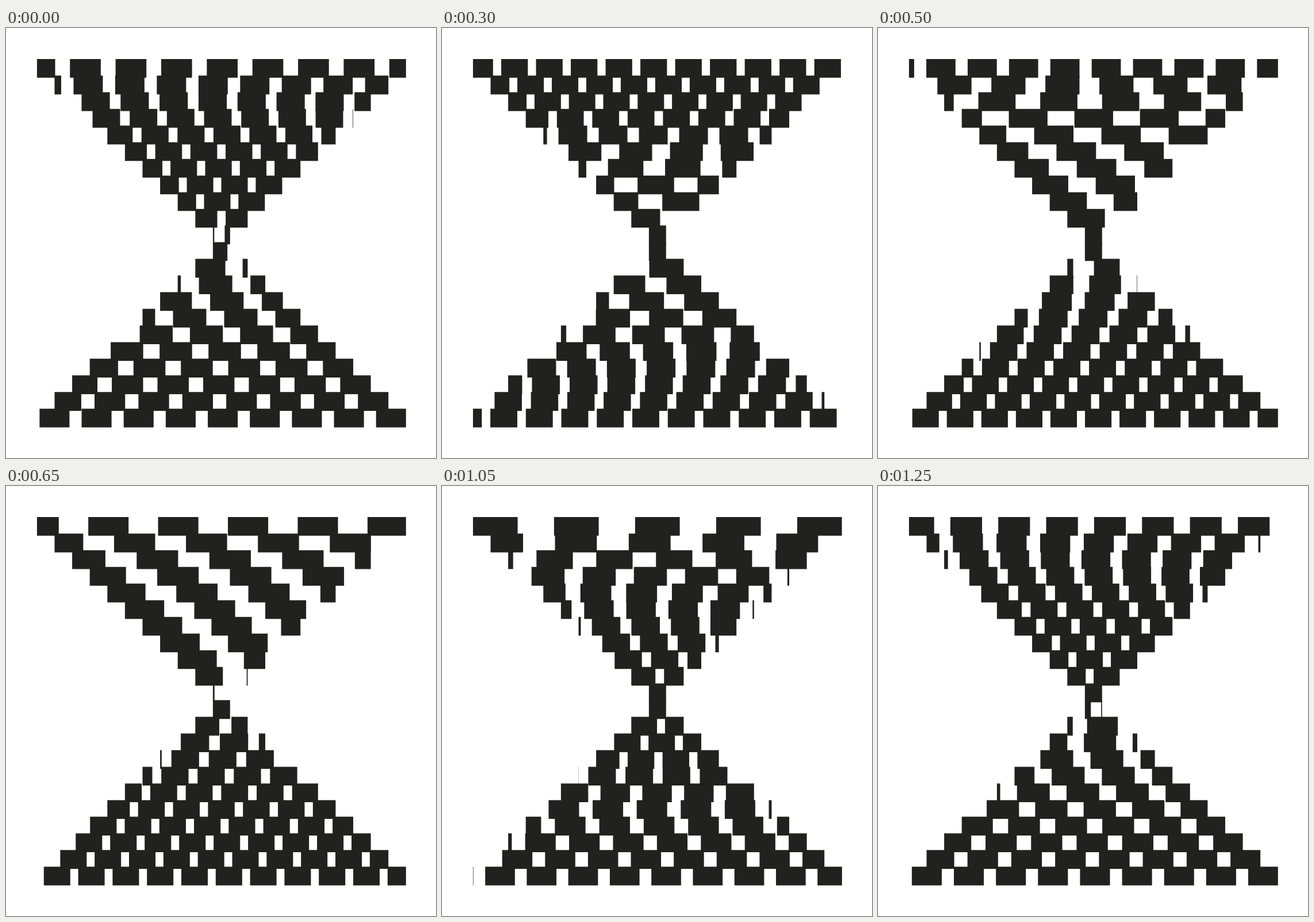
Write an HTML page with a canvas that moves like this. It is 748 px wide and 748 px high and loops after 1300 ms.

```html
<!DOCTYPE html>
<html lang="en">
<head>
<meta charset="utf-8">
<title>Dashed hourglass</title>
<style>
  html, body { margin: 0; width: 100%; height: 100%; overflow: hidden; background: #fff; }
  canvas { display: block; }
</style>
</head>
<body>
<canvas id="stage" width="748" height="748"></canvas>
<script>
const ctx = document.getElementById('stage').getContext('2d');

const STEP = 50, STEPS = 26, LEG = 13, LEAD = 5, ROWS = 22;
const LEFT = 53.9, RIGHT = 695.8, INSET = 30.6;
const TOP = 53.9, PITCH = 28.97, THICK = 32.6;
const DASH = 46, GAP = 13.8, SHIFT = 133.6;

const mix = (a, b, s) => a + (b - a) * s;

// Cubic Bezier easing (x1, 0, 0, 1), solved by bisection.
function ease(x, x1) {
  let lo = 0, hi = 1;
  for (let i = 0; i < 30; i++) {
    const p = (lo + hi) / 2;
    if (3 * p * (1 - p) ** 2 * x1 + p ** 3 < x) lo = p;
    else hi = p;
  }
  return lo * lo * (3 - 2 * lo);
}

// Rows alternate between closing and opening; each runs one step ahead of the row above.
function openness(step, row) {
  const n = step + row + LEAD;
  const leg = Math.floor(n / LEG);
  const s = ease(n % LEG / LEG, leg === 2 ? 1 / 6 : 1 / 3);
  return leg % 2 ? s : 1 - s;
}

function drawRow(row, s) {
  const inset = INSET * Math.min(row, ROWS - 1 - row);
  const ends = [LEFT + inset, RIGHT - inset];
  if (row >= ROWS / 2) ends.reverse();
  const y = TOP + PITCH * row + THICK / 2;

  const wideDash = 77.7 - 1.22 * row;
  const wideGap = 63.3 - 2.01 * row;
  ctx.setLineDash([mix(DASH, wideDash, s), mix(GAP, wideGap, s)]);
  ctx.lineDashOffset = SHIFT * (1 - s);
  ctx.beginPath();
  ctx.moveTo(ends[0], y);
  ctx.lineTo(ends[1], y);
  ctx.stroke();
}

function draw(ms) {
  const step = Math.floor(ms / STEP) % STEPS;
  ctx.fillStyle = '#fff';
  ctx.fillRect(0, 0, 748, 748);
  ctx.strokeStyle = '#212120';
  ctx.lineWidth = THICK;
  for (let row = 0; row < ROWS; row++) drawRow(row, openness(step, row));
}

const start = performance.now() - 1;
function tick() {
  draw(performance.now() - start);
  requestAnimationFrame(tick);
}
tick();
</script>
</body>
</html>
```
